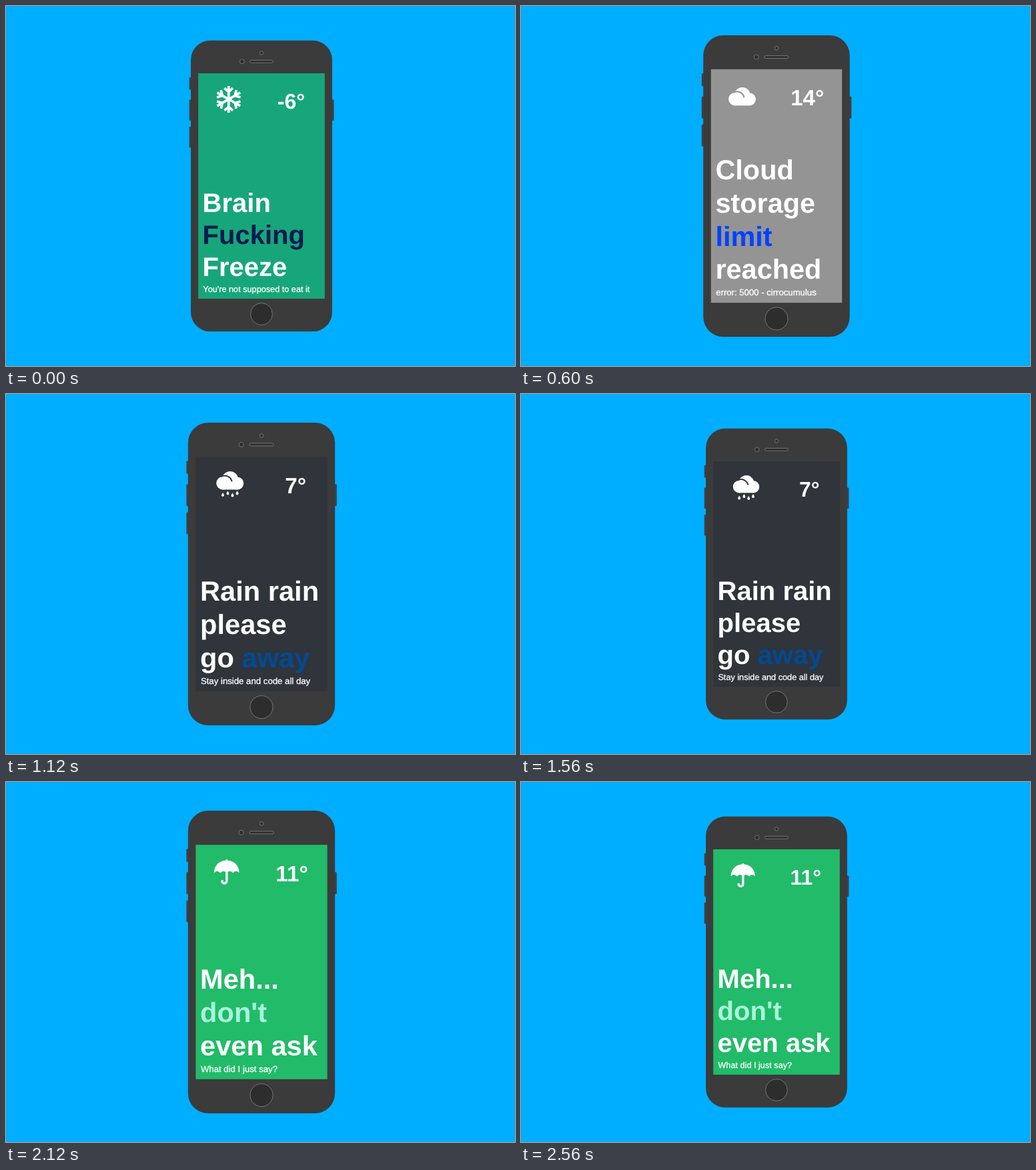
Recreate the animation shown at these times as an HTML page. Size 763 px wide and 540 px high, loop 2600 ms.

```html
<!DOCTYPE html>
<html lang="en">
<head>
<meta charset="utf-8">
<title>Weather phone</title>
<style>
  html, body { margin: 0; width: 100%; height: 100%; overflow: hidden; background: #00aeff; }
  svg { display: block; width: 100%; height: 100%; }
  text { font-family: "Liberation Sans", Arial, sans-serif; fill: #fff; text-rendering: geometricPrecision; white-space: pre; }
  .title { font-size: 40px; font-weight: 700; }
  .temp { font-size: 32px; font-weight: 700; }
  .note { font-size: 12.7px; stroke: #fff; stroke-width: .3px; }
  .hole { fill: #2d2d2d; stroke: #858585; stroke-width: .8; }
  .icon { fill: #fff; }
  .screen { display: none; }
  .screen.on { display: inline; }
</style>
</head>
<body>
<svg viewBox="0 0 763 540">
  <defs>
    <g id="arm">
      <path d="M0 0V-20M-6.2 -16.8L0 -11L6.2 -16.8"/>
    </g>
    <g id="cloud">
      <circle cx="9.3" cy="17" r="9.3"/>
      <circle cx="20" cy="11.6" r="11.6"/>
      <circle cx="30.4" cy="17.2" r="9.1"/>
      <rect x="9.3" y="12" width="21.1" height="14.3"/>
      <circle cx="13.6" cy="15.4" r="9.2"/>
    </g>
    <path id="gap" d="M6.6 7.6C14 3.8 21 8 22.6 14.6" fill="none" stroke-width="2"/>
    <path id="drop" d="M0 -3.2C.7 -1.6 2 -.6 2 .8A2 2 0 0 1 -2 .8C-2 -.6 -.7 -1.6 0 -3.2Z"/>
  </defs>

  <rect width="763" height="540" fill="#00aeff"/>

  <g id="phone">
    <g fill="#414141">
      <rect x="274.7" y="107" width="6" height="18.5" rx="1.2"/>
      <rect x="274.7" y="140.5" width="6" height="31.5" rx="1.2"/>
      <rect x="274.7" y="181" width="6" height="31.5" rx="1.2"/>
      <rect x="485.5" y="140.5" width="6" height="31.5" rx="1.2"/>
    </g>
    <rect x="277.1" y="51.8" width="211.8" height="436.5" rx="29" fill="#3b3b3b"/>
    <circle class="hole" cx="383" cy="70.5" r="2.7"/>
    <circle class="hole" cx="353.8" cy="83.3" r="3.4"/>
    <rect class="hole" x="365.6" y="81.4" width="34.8" height="3.8" rx="1.9"/>
    <circle class="hole" cx="383" cy="462" r="16.4"/>

    <g class="screen on">
      <rect x="288.2" y="101" width="189.6" height="338" fill="#17a67a"/>
      <g transform="translate(333.8 140)" fill="none" stroke="#fff" stroke-width="3.7">
        <use href="#arm"/>
        <use href="#arm" transform="rotate(60)"/>
        <use href="#arm" transform="rotate(120)"/>
        <use href="#arm" transform="rotate(180)"/>
        <use href="#arm" transform="rotate(240)"/>
        <use href="#arm" transform="rotate(300)"/>
      </g>
      <text class="temp" x="406.8" y="153.6">-6°</text>
      <text class="title" x="294.6" y="308.5">Brain</text>
      <text class="title" x="294.6" y="356.5" style="fill:#001a50">Fucking</text>
      <text class="title" x="294.6" y="404.6">Freeze</text>
      <text class="note" x="295.4" y="428.6">You're not supposed to eat it</text>
    </g>

    <g class="screen">
      <rect x="288.2" y="101" width="189.6" height="338" fill="#949494"/>
      <g class="icon" transform="translate(313.6 127.2)">
        <use href="#cloud"/>
        <use href="#gap" stroke="#949494"/>
      </g>
      <text class="temp" x="403.4" y="153.6">14°</text>
      <text class="title" x="294.6" y="260.4">Cloud</text>
      <text class="title" x="294.6" y="308.5">storage</text>
      <text class="title" x="294.6" y="356.5" style="fill:#0042ff">limit</text>
      <text class="title" x="294.6" y="404.6">reached</text>
      <text class="note" x="295.4" y="428.6">error: 5000 - cirrocumulus</text>
    </g>

    <g class="screen">
      <rect x="288.2" y="101" width="189.6" height="338" fill="#30343b"/>
      <g class="icon" transform="translate(317.8 122)">
        <use href="#cloud"/>
        <use href="#gap" stroke="#30343b"/>
      </g>
      <g class="icon">
        <use href="#drop" x="327.2" y="155.6"/>
        <use href="#drop" x="334.4" y="153.2"/>
        <use href="#drop" x="341.2" y="156.2"/>
        <use href="#drop" x="348" y="153.2"/>
      </g>
      <text class="temp" x="417" y="153.6">7°</text>
      <text class="title" x="294.6" y="308.5">Rain rain</text>
      <text class="title" x="294.6" y="356.5">please</text>
      <text class="title" x="294.6" y="404.6">go <tspan style="fill:#004a94">away</tspan></text>
      <text class="note" x="295.4" y="428.6">Stay inside and code all day</text>
    </g>

    <g class="screen">
      <rect x="288.2" y="101" width="189.6" height="338" fill="#22bb69"/>
      <path class="icon" d="M314.5 141.5C315 129 323.5 123.8 331.2 123.5A1.6 1.6 0 0 1 334.4 123.5C342 123.8 350.5 129 351 141.5Q346.5 136.5 342 141.5Q337.4 136.5 332.8 141.5Q328.2 136.5 323.6 141.5Q319 136.5 314.5 141.5Z"/>
      <path d="M332.8 135V153.2a3.3 3.3 0 0 1 -6.6 0v-1.2" fill="none" stroke="#fff" stroke-width="3.3"/>
      <text class="temp" x="403.4" y="153.6">11°</text>
      <text class="title" x="294.6" y="308.5">Meh...</text>
      <text class="title" x="294.6" y="356.5" style="fill:#a9f4dc">don't</text>
      <text class="title" x="294.6" y="404.6">even ask</text>
      <text class="note" x="295.4" y="428.6">What did I just say?</text>
    </g>
  </g>
</svg>
<script>
  const LOOP = 2600, TICK = 40, CYCLE = 25, FIRST_CUT = 3;
  const phone = document.getElementById('phone');
  const screens = [...document.querySelectorAll('.screen')];

  const smooth = x => (1 - Math.cos(Math.PI * x)) / 2;
  const burst = x => 1 - (1 - x) ** 3.6;

  // Two beats per screen: [start, end, scale from, scale to, easing], in ticks
  const beats = [
    [0, 8.75, 1.04, .9165, smooth],
    [8.75, 12.41, .9165, 1.04, smooth],
    [12.41, 21, 1.04, .928, smooth],
    [21, 25, .928, 1.04, burst]
  ];

  function scaleAt(p) {
    const [start, end, from, to, ease] = beats.find(b => p < b[1]);
    return from + (to - from) * ease((p - start) / (end - start));
  }

  function draw() {
    const tick = Math.floor(performance.now() % LOOP / TICK);
    const sinceCut = tick - FIRST_CUT + CYCLE;
    const current = Math.floor(sinceCut / CYCLE);
    const s = scaleAt(sinceCut % CYCLE);
    phone.setAttribute('transform', `translate(383 270) scale(${s.toFixed(4)}) translate(-383 -270)`);
    screens.forEach((el, i) => el.classList.toggle('on', i === current));
    requestAnimationFrame(draw);
  }
  draw();
</script>
</body>
</html>
```
